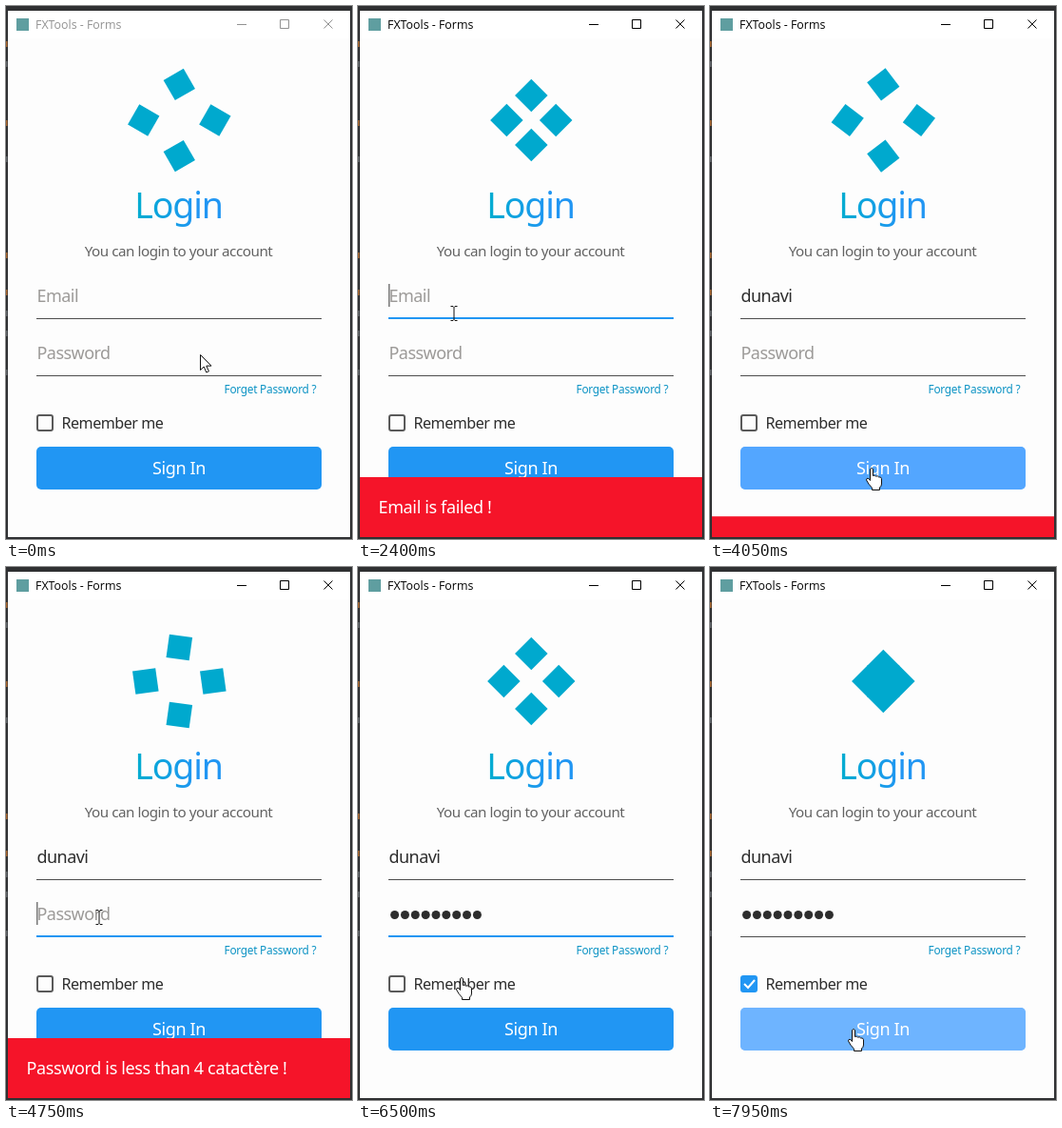
Write an HTML page that moves like this. It is 364x560 px and loops after 8000 ms.

```html
<!DOCTYPE html>
<html lang="en">
<head>
<meta charset="utf-8">
<title>Login form</title>
<style>
  html, body { margin: 0; width: 100%; height: 100%; overflow: hidden; background: #2f3032; }
  svg { display: block; width: 364px; height: 560px; }
  text { font-family: "Noto Sans", sans-serif; letter-spacing: -.02em; white-space: pre; }
  .tight { letter-spacing: -.03em; }
  .field { font-size: 18px; fill: #2d2d2d; letter-spacing: -.03em; }
  .field.hint { fill: #9c9a98; }
  .caption { font: 12.4px "Open Sans", sans-serif; letter-spacing: 0; }
  .big { font-size: 18px; fill: #fff; }
  .cursor { fill: #fff; stroke: #111; stroke-width: 1; stroke-linejoin: round; }
</style>
</head>
<body>
<svg viewBox="0 0 364 560">
  <defs>
    <linearGradient id="heading"><stop stop-color="#00adcf"/><stop offset=".7" stop-color="#2196f3"/></linearGradient>
    <clipPath id="buttonShape"><rect x="32" y="463" width="300" height="45" rx="5"/></clipPath>
    <clipPath id="windowShape"><rect x="2" y="5" width="360" height="553"/></clipPath>
  </defs>
  <rect width="364" height="560" fill="#2f3032"/>
  <g id="edge"></g>
  <rect x="2" y="5" width="360" height="553" fill="#fdfdfd"/>
  <rect x="2" y="5" width="360" height="29" fill="#fff"/>

  <rect x="11" y="13" width="13" height="13" fill="#5f9ea0"/>
  <text id="caption" class="caption" x="31" y="24">FXTools - Forms</text>
  <path id="controls" fill="none" d="M243 19.5h10M288.5 14.5h9v9h-9zM334.5 14.5l9 9m0-9l-9 9"/>

  <g id="loader" fill="#00a9ce"></g>

  <text class="tight" x="181.5" y="223" font-size="37.5" text-anchor="middle" fill="url(#heading)">Login</text>
  <text class="tight" x="181.5" y="263" font-size="15.2" text-anchor="middle" fill="#626262">You can login to your account</text>

  <text id="email" class="field" x="32.5" y="311"></text>
  <rect id="emailLine" x="32" width="300"/>
  <text id="password" class="field hint" x="32.500" y="371">Password</text>
  <g id="dots" fill="#2d2d2d"></g>
  <rect id="passwordLine" x="32" width="300"/>
  <rect id="caret" width="1.5" height="24" fill="#777"/>
  <text x="229.5" y="407" font-size="11.8" fill="#0c93c4">Forget Password ?</text>

  <rect id="box" x="33" y="430" width="16" height="16" rx="2" stroke-width="2"/>
  <path id="tick" d="M36 438l4 4 7-8" fill="none" stroke="#fff" stroke-width="2"/>
  <text class="tight" x="58.5" y="444" font-size="16.1" fill="#2d2d2d">Remember me</text>

  <g clip-path="url(#buttonShape)">
    <rect id="button" x="32" y="463" width="300" height="45"/>
    <circle id="ripple" fill="#fff"/>
  </g>
  <text class="big" x="182" y="492" text-anchor="middle">Sign In</text>

  <g clip-path="url(#windowShape)">
    <g id="snack">
      <rect x="2" width="360" height="63" fill="#f51429"/>
      <text id="message" class="big" x="21.5" y="38"></text>
    </g>
  </g>

  <g id="pointer">
    <path id="arrow" class="cursor" d="M.5.5v16l3.700-3.500 2.600 6 2.600-1.200-2.600-5.700h5.200z"/>
    <path id="hand" class="cursor" d="M-1.500 1.500q1.500-2 3 0v7q2-1.200 3 .6 2-1 3 .8 2.500-.6 3 1.800v5.300q0 2.500-2 4v2.500h-8v-2.200q-4-4-6-8.300 0-2.500 2.500-1.500l1.500 2z"/>
    <path id="beam" fill="none" stroke="#111" d="M-3.500-7.500h2.500l1 1 1-1h2.500M0-6.500v13M-3.500 7.500h2.500l1-1 1 1h2.500"/>
  </g>
</svg>
<script>
const LOOP = 8000, STEP = 50, SPIN = 510;
const NAME = "dunavi", DOTS = 9, TILE = 24.4;
const $ = id => document.getElementById(id);
const set = (node, attrs) => { for (const k in attrs) node.setAttribute(k, attrs[k]); };
const show = (node, on) => { node.style.display = on ? "" : "none"; };
const clamp = v => Math.max(0, Math.min(1, v));
const smooth = v => (1 - Math.cos(Math.PI * clamp(v))) / 2;
const ease = (t, start, length) => smooth((t - start) / length);
const within = (t, a, b) => t >= a && t < b;

function add(parent, tag, attrs) {
  const node = document.createElementNS("http://www.w3.org/2000/svg", tag);
  set(node, attrs);
  return parent.appendChild(node);
}

// Interpolates rows of [time, value, ...] at time t.
function track(rows, t, shape = v => v) {
  const i = rows.findIndex(r => r[0] > t);
  if (i < 0) return rows[rows.length - 1].slice(1);
  if (i === 0) return rows[0].slice(1);
  const a = rows[i - 1], b = rows[i], k = shape((t - a[0]) / (b[0] - a[0]));
  return a.slice(1).map((v, n) => v + (b[n + 1] - v) * k);
}

const spread = [[0, 16], [60, 25.9], [80, 28.9], [125, 34.5], [180, 37.6], [300, 37.4],
  [370, 35.5], [410, 29.5], [450, 21.8], [490, 18], [510, 16]];
const turn = [[150, 0], [210, 15], [260, 25], [370, 53], [450, 90]];
const path = [[50, 204, 366], [700, 200, 501], [1350, 200, 501], [1700, 125, 331], [2050, 101, 323],
  [2950, 101, 323], [3300, 143, 419], [3600, 170, 485], [4100, 170, 485], [4300, 150, 459],
  [4550, 98, 368], [6050, 98, 368], [6450, 109, 431], [6850, 109, 431], [7250, 151, 485]];
const presses = [
  { start: 1100, release: 1400, x: 200, y: 501 },
  { start: 3700, release: 4000, x: 170, y: 485 },
  { start: 7300, release: LOOP, x: 151, y: 485 }
];
const alerts = [
  { open: 1450, close: 2700, text: "Email is failed !" },
  { open: 3950, close: 5300, text: "Password is less than 4 catactère !" }
];
const fields = [
  { line: "emailLine", y: 328, from: 2050, to: 3700, typing: 2450, pace: 70, count: NAME.length, advance: 9 },
  { line: "passwordLine", y: 388, from: 4550, to: 6750, typing: 5050, pace: 110, count: DOTS, advance: 10.85 }
];

[[37, 0], [58, 1], [120, 0], [158, 1], [259, 0], [298, 0], [320, 1], [341, 1], [382, 1]].forEach(([y, grey]) =>
  add($("edge"), "rect", { x: 0, y, width: 1.5, height: 6, fill: grey ? "#62666a" : "#a8672f" }));
const tiles = [[0, -1], [1, 0], [0, 1], [-1, 0]].map(([x, y]) =>
  ({ x, y, node: add($("loader"), "rect", { x: -TILE / 2, y: -TILE / 2, width: TILE, height: TILE }) }));
const dots = Array.from({ length: DOTS }, (_, i) =>
  add($("dots"), "circle", { cx: 38.6 + i * 10.85, cy: 365.5, r: 4.5 }));

const typed = (f, t) => Math.max(0, Math.min(f.count, Math.floor((t - f.typing) / f.pace) + 1));

function drawLoader(t) {
  const phase = (t + 210) % SPIN, [d] = track(spread, phase), [q] = track(turn, phase);
  for (const { x, y, node } of tiles)
    set(node, { transform: `translate(${182.3 + x * d} ${120 + y * d}) rotate(${45 + (y ? q : -q)})` });
}

function drawFields(t) {
  const [mail, pass] = fields.map(f => typed(f, t));
  $("email").textContent = mail ? NAME.slice(0, mail) : "Email";
  $("email").classList.toggle("hint", !mail);
  show($("password"), !pass);
  dots.forEach((dot, i) => show(dot, i < pass));
  show($("caret"), false);
  fields.forEach((f, i) => {
    const focus = within(t, f.from, f.to), count = i ? pass : mail;
    set($(f.line), focus ? { y: f.y - 1, height: 2, fill: "#2196f3" } : { y: f.y, height: 1, fill: "#4d4d4d" });
    if (!focus) return;
    const since = count ? t - f.typing - (count - 1) * f.pace : t - f.from;
    show($("caret"), since % 1000 < 500);
    set($("caret"), { x: 32 + (count ? 1 + count * f.advance : 0), y: f.y - 36 });
  });
  const checked = t >= 6750;
  set($("box"), { fill: checked ? "#2196f3" : "#fdfdfd", stroke: checked ? "#2196f3" : "#5a5a5a" });
  show($("tick"), checked);
}

function drawButton(t, hover) {
  set($("button"), { fill: hover ? "#057dff" : "#2196f3" });
  const p = presses.find(p => within(t, p.start, p.release + 200));
  show($("ripple"), p);
  if (!p) return;
  const age = t - p.start;
  set($("ripple"), { cx: p.x, cy: p.y, r: Math.min(220, age * .545),
    opacity: .42 * clamp(age / 270) * clamp(1 - (t - p.release) / 200) });
}

function drawSnack(t) {
  const a = alerts.find(a => within(t, a.open, a.close + 250));
  show($("snack"), a);
  if (!a) return;
  const up = ease(t, a.open, 250) - ease(t, a.close, 250);
  $("message").textContent = a.text;
  set($("snack"), { transform: `translate(0 ${558 - 63 * up})` });
}

function drawPointer(t, x, y, hover) {
  const onCheck = x > 32 && x < 163 && within(y, 428, 449);
  const onField = t >= 100 && (within(y, 292, 329) || within(y, 350, 389));
  const kind = hover || onCheck ? "hand" : onField ? "beam" : "arrow";
  for (const id of ["arrow", "hand", "beam"]) show($(id), id === kind);
  set($("pointer"), { transform: `translate(${Math.round(x)} ${Math.round(y)})` });
}

function draw(t) {
  const [x, y] = track(path, t, smooth), hover = within(y, 463, 508);
  const active = t >= 950;
  set($("caption"), { fill: active ? "#000" : "#929292" });
  set($("controls"), { stroke: active ? "#000" : "#929292" });
  drawLoader(t);
  drawFields(t);
  drawButton(t, hover);
  drawSnack(t);
  drawPointer(t, x, y, hover);
}

const origin = performance.now();
function tick() {
  const t = Math.floor(((performance.now() - origin) % LOOP) / STEP) * STEP;
  draw(t < 100 ? 0 : t);
  requestAnimationFrame(tick);
}
tick();
</script>
</body>
</html>
```
